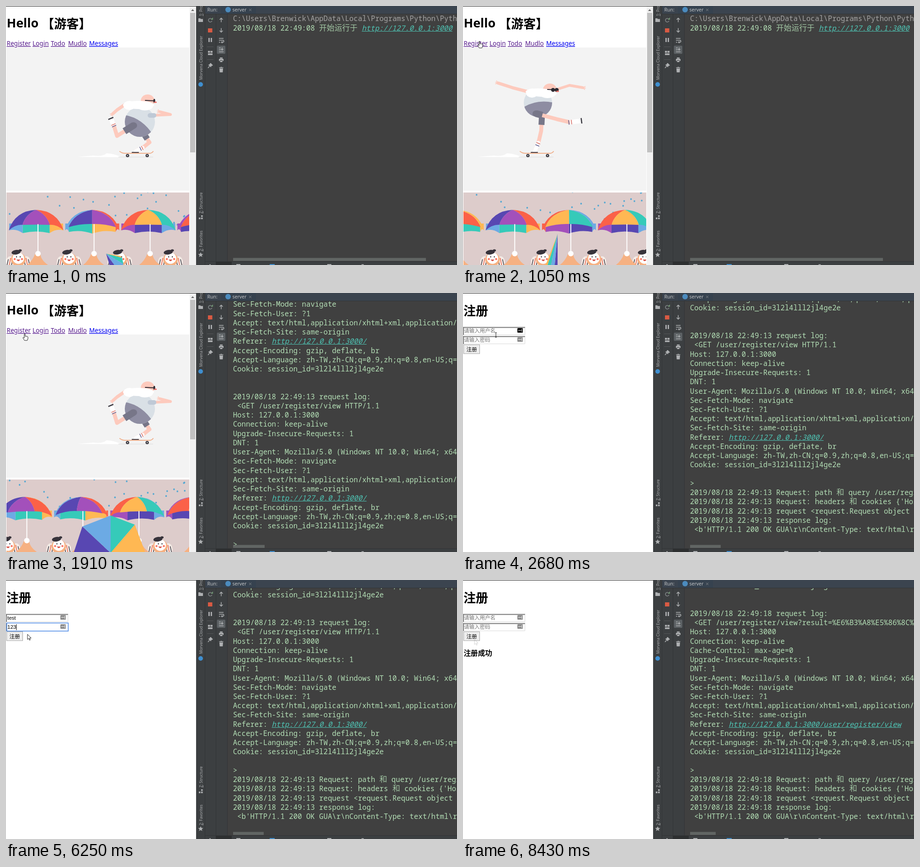
Animation, 987 px wide and 568 px high, one loop 8520 ms. Source, as an HTML page with a canvas:

```html
<!DOCTYPE html>
<html lang="zh">
<head>
<meta charset="utf-8">
<title>Register demo</title>
<style>
html, body { margin: 0; width: 987px; height: 568px; overflow: hidden; background: #fff; }
svg, canvas { position: absolute; left: 0; top: 0; }
svg text { font-family: "Noto Sans", "Noto Sans CJK SC", "Noto Sans CJK JP", sans-serif; white-space: pre; }
#log { position: absolute; left: 485px; top: 18px; width: 502px; height: 542px; overflow: hidden; }
#log pre {
  position: absolute; left: 11.7px; margin: 0; color: #b3deb5;
  font: 15.72px/20.23px "Noto Sans Mono", "Noto Sans CJK SC", "Noto Sans CJK JP", monospace;
}
#log i { color: #4fc4b4; text-decoration: underline; }
#log b { font-size: 16.8px; font-weight: 300; line-height: 0; opacity: .85; }
#log u { color: #a3a3a3; text-decoration: none; }
.h1 { font-size: 27px; font-weight: 700; }
.link { font-size: 13.6px; fill: #551a8b; text-decoration: underline; }
.cjk { font-size: 11.5px; }
.hint { font-size: 11.5px; fill: #757575; }
svg .typed { font: 11.5px "Liberation Sans", Arial, sans-serif; }
.side { font-size: 8.5px; fill: #aeb0b2; }
.ui { font-size: 10.5px; fill: #c2c4c6; }
.ico { fill: #afb1b3; }
.ln { fill: none; stroke: #afb1b3; stroke-width: 1.5; }
</style>
</head>
<body>
<svg id="page" width="987" height="568" viewBox="0 0 987 568">
  <rect width="416" height="1" fill="#222"/>
  <g id="home">
    <text class="h1" x="1.5" y="47">Hello <tspan dy="1.5">【游客】</tspan></text>
    <text class="link" x="1.5" y="87">Register</text>
    <text class="link" x="58" y="87">Login</text>
    <text class="link" x="98" y="87">Todo</text>
    <text class="link" x="136" y="87">Mudlo</text>
    <text class="link" x="182" y="87" style="fill:#00e">Messages</text>
    <rect x="402" y="1" width="14" height="567" fill="#f1f1f1"/>
    <rect x="403" y="15" width="11" height="306" fill="#c1c1c1"/>
    <path d="M405 11l3.5-4 3.5 4z" fill="#6a6a6a"/>
  </g>
  <g id="form">
    <text class="h1" x="1" y="49">注册</text>
    <g id="fields"></g>
    <rect id="btn" x="1.5" y="113.5" width="35" height="19.5" fill="#eee" stroke="#a2a2a2"/>
    <text class="cjk" x="7.5" y="128">注册</text>
    <text id="done" x="1.5" y="166" font-size="15.6" font-weight="700">注册成功</text>
  </g>
  <g id="ide">
    <rect x="416" width="571" height="568" fill="#3c3f41"/>
    <rect x="435" width="552" height="18" fill="#3b444f"/>
    <rect x="470" width="77" height="18" fill="#36424f"/>
    <rect x="484" y="18" width="503" height="542" fill="#404040"/>
    <path d="M435.5 0V568M459.5 18V560M484.5 18V560M435 17.5H987M435 560.5H987" stroke="#323436" fill="none"/>
    <path d="M440 89.5H454M440 117.5H454" stroke="#555759"/>
    <text class="ui" x="440.5" y="12">Run:</text>
    <circle cx="486" cy="8" r="6" fill="#4b8bbe"/>
    <text class="ui" x="495.5" y="12">server</text>
    <path d="M532 6l5 5m0-5l-5 5" stroke="#85898c"/>
    <text class="side" transform="translate(430 22) rotate(-90)"><tspan text-decoration="underline">1</tspan>: Project</text>
    <text class="side" transform="translate(430 162) rotate(-90)">Morvena Cloud Explorer</text>
    <text class="side" transform="translate(430 455) rotate(-90)"><tspan text-decoration="underline">Z</tspan>: Structure</text>
    <text class="side" transform="translate(430 538) rotate(-90)"><tspan text-decoration="underline">2</tspan>: Favorites</text>
    <path class="ico" d="M421 27h4l1.5 1.5h4.500v6.500h-10zM422 464h3.500v3.500h-3.500zM427 464h3.500v3.500h-3.500zM427 459h3.500v3.500h-3.500z"/>
    <path class="ico" d="M426 540l1.500 3.600 4 .3-3 2.600 1 4-3.500-2.200-3.500 2.200 1-4-3-2.600 4-.3z"/>
    <circle cx="426" cy="172" r="5" fill="#3f8fd0"/>
    <path class="ln" d="M450 28.500a4 4 0 1 0 .8 4" style="stroke:#85898b"/>
    <path d="M448 30h5v-5z" fill="#6f9572"/>
    <rect x="442" y="49" width="9.500" height="9" fill="#d95a43"/>
    <path class="ico" d="M443 70h2.800v9h-2.800zM448 70h2.800v9h-2.800zM442 98.500h4.500v4h-4.500zM447.500 98.500h4.500v4h-4.500zM442 104h10v3.500h-10z"/>
    <path class="ico" d="M448 125l5 5-1.500 1-2 .5-1 3-6-5.500 3-1 .8-2z"/>
    <path class="ln" d="M445.500 132l-3.500 4M471 35.500v-9m-3.500 3.500l3.500-3.500 3.500 3.500M471 48.500v9m-3.500-3.500l3.500 3.500 3.500-3.500M466 71h10M466 75h8.500a2 2 0 0 1 0 4.500h-3m2-2l-2 2 2 2M466 79.500h3"/>
    <rect x="461.500" y="87" width="18.500" height="18" rx="2" fill="#5c6164"/>
    <path class="ln" d="M466 92h4M466 96h4M466 100.500h10M473 91v6m-2.500-2.500l2.500 2.500 2.500-2.500"/>
    <path class="ico" d="M468 113h6v2.500h-6zM466 116h10v4.500h-2v-1.500h-6v1.500h-2zM468.500 120h5v3h-5zM467 137h8l-.7 8.500h-6.600zM466.500 134.500h3l.5-1h2l.5 1h3v1.500h-9z"/>
    <rect x="459" y="561" width="35" height="7" fill="#2d2f30"/>
    <path class="ico" d="M445 566.500h3v1.500h-3zM504 566h9v2h-9zM703 566h9v2h-9zM778 566.500h5v1.500h-5z"/>
    <rect x="577" y="566" width="11" height="2" fill="#3f8fd0"/>
  </g>
</svg>
<canvas id="art" width="402" height="568"></canvas>
<div id="log"><pre></pre></div>
<svg id="top" width="987" height="568" viewBox="0 0 987 568">
  <rect id="bar" x="497" y="552.500" height="6.500" fill="#676b69" opacity=".85"/>
  <path id="cursor"/>
</svg>
<script>
const LOOP = 8520;
const $ = s => document.querySelector(s);
const show = (el, on) => { el.style.display = on ? '' : 'none'; };
const mix = (a, b, k) => a + (b - a) * k;
const last = (rows, t) => rows.filter(r => r[0] <= t).pop();

// Bursts of screen refreshes: first, last, count
const BURSTS = [[0, 0, 1], [70, 890, 11], [960, 1510, 8], [1670, 2450, 11], [2530, 2840, 5],
  [4310, 4620, 5], [6100, 6640, 8], [7030, 7740, 10]];
function snap(t) {
  const [a, b, n] = last(BURSTS, t);
  if (n < 2 || t >= b) return b;
  const d = (b - a) / (n - 1);
  return a + Math.floor((t - a) / d) * d;
}

// ---- console ----
const DAY = '2019/08/18 22:49:';
const HOST = 'http://127.0.0.1:3000';
const VIEW = '/user/register/view';
const tail = ref => ['Sec-Fetch-Mode: navigate', 'Sec-Fetch-User: ?1',
  'Accept: text/html,application/xhtml+xml,application/xml;q=0.9',
  'Sec-Fetch-Site: same-origin', 'Referer: ' + HOST + ref, 'Accept-Encoding: gzip, deflate, br',
  'Accept-Language: zh-TW,zh-CN;q=0.9,zh;q=0.8,en-US;q=0.7', 'Cookie: session_id=3l2l4lll2jl4ge2e'];
const request = (sec, call, ref, extra = []) => ['', '', DAY + sec + ' request log:',
  ` <${call} HTTP/1.1`, 'Host: 127.0.0.1:3000', 'Connection: keep-alive', ...extra,
  'Upgrade-Insecure-Requests: 1', 'DNT: 1',
  'User-Agent: Mozilla/5.0 (Windows NT 10.0; Win64; x64) AppleWebKit', ...tail(ref), '', '>'];
const reply = (sec, path, status) => [`Request: path 和 query ${path} {}`,
  "Request: headers 和 cookies {'Host': '127.0.0.1:3000'", 'request <request.Request object at 0x0000',
  'response log:'].map(s => DAY + sec + ' ' + s)
  .concat(` <b'HTTP/1.1 ${status} GUA\\r\\nContent-Type: text/html\\r\\n`);

const first = request(13, 'GET ' + VIEW, '/');
const cache = ['Cache-Control: max-age=0'];
const post = request(18, 'POST /user/register', VIEW, cache);
const final = request(18, `GET ${VIEW}?result=%E6%B3%A8%E5%86%8C%E6%88%90`, VIEW, cache);
// start, top of first line, scrollbar width, lines
const LOGS = [
  [0, 17.4, 422, ['C:\\Users\\Brenwick\\AppData\\Local\\Programs\\Python\\Python36', DAY + '08 开始运行于 ' + HOST]],
  [1750, 14.4, 69, [...tail('/'), ...first]],
  [2370, 2.2, 67, [...tail('/').slice(-2), ...first, ...reply(13, VIEW, '200 OK')]],
  [7110, 2.2, 60, [...tail('/').slice(-1), ...post, ...reply(18, '/user/register', '302 OK')]],
  [7430, 2.2, 56, [...tail('/').slice(-1), ...final, ...reply(18, VIEW, '200 OK')]],
];
const markup = s => s.replace(/</g, '&lt;').replace(/http:\S+/, '<i>$&</i>')
  .replace(/[\u4e00-\u9fff]+/g, '<b>$&</b>').replace(/^C:.*/, '<u>$&</u>');
let shown;
function drawLog(t) {
  const row = last(LOGS, t);
  if (row === shown) return;
  shown = row;
  const pre = $('#log pre');
  pre.style.top = row[1] - 18 + 'px';
  pre.innerHTML = row[3].map(markup).join('\n');
  $('#bar').setAttribute('width', row[2]);
}

// ---- form ----
const FIELDS = [
  { y: 75, hint: '请输入用户名', word: 'test', keys: [3850, 4000, 4150, 4310], focus: [2990, 4770], blink: [3450, 3850], hover: [2600, 4400] },
  { y: 95, hint: '请输入密码', word: '123', keys: [5470, 5700, 5930], focus: [4770, 6560], blink: [5320, 5470], hover: [4540, 6180] },
];
const RELOAD = 7430;
$('#fields').innerHTML = FIELDS.map(({ y, hint }) => `<g>
  <path d="M1 ${y + 17}V${y}.500H136" fill="none" stroke="#777" stroke-width="1.800"/>
  <path d="M2 ${y + 16.5}H135.500V${y + 1}" fill="none" stroke="#d8d8d8"/>
  <rect class="ring" x="1.800" y="${y - .7}" width="134.400" height="17.700" fill="#fff" stroke="#5b93e8" stroke-width="1.700"/>
  <text class="hint" x="2" y="${y + 12}">${hint}</text>
  <text class="typed" x="3" y="${y + 12}"></text>
  <rect class="caret" y="${y + 2}" width="1" height="13"/>
  <rect class="icon" x="119" y="${y + 2}" width="12" height="10" rx="1.500"/>
  <path d="M121 ${y + 7}h6.500M128.800 ${y + 4}v6" stroke="#fff" stroke-width="1.400" stroke-dasharray="1.600 .8"/></g>`).join('');
const within = ([a, b], t) => t >= a && t < b;
function drawForm(t) {
  [...$('#fields').children].forEach((g, i) => {
    const f = FIELDS[i], get = c => g.querySelector(c);
    const n = t < RELOAD ? f.keys.filter(k => k <= t).length : 0;
    const focus = within(f.focus, t);
    get('.typed').textContent = f.word.slice(0, n);
    show(get('.hint'), !n);
    show(get('.ring'), focus);
    show(get('.caret'), focus && !within(f.blink, t) && !within([6430, 6560], t));
    get('.caret').setAttribute('x', 3 + (n ? get('.typed').getComputedTextLength() : 0));
    get('.icon').setAttribute('fill', within(f.hover, t) ? '#000' : '#8b8b8b');
  });
  $('#btn').setAttribute('fill', within([6560, 6790], t) ? '#d2d2d2' : '#eee');
  show($('#done'), t >= RELOAD);
}

// ---- cursor ----
const SHAPES = {
  arrow: 'M0 0V11.500L2.700 9 4.500 13 6.200 12.200 4.500 8.300H8z',
  beam: 'M-2 -5H2M0 -5V5M-2 5H2',
  hand: 'M-1 1Q0 -1 1 1V6Q6 5 7 7.500V11L5.500 15H-.5L-4 9.500Q-4 8 -2.500 8.500L-1 10z',
};
const PATH = [[70, 850, 470, 'beam'], [430, 470, 230, 'arrow'], [890, 38, 86, 'hand'], [960, 36, 77, 'hand'],
  [1510, 36, 77, 'hand'], [1670, 41, 89, 'hand'], [2370, 41, 89, 'arrow'], [2600, 72, 92, 'beam'],
  [4310, 72, 92, 'beam'], [4387, 69, 95, 'arrow'], [4470, 69, 95, 'arrow'], [4543, 69, 102, 'beam'],
  [6100, 69, 102, 'beam'], [6177, 47, 119, 'arrow'], [6320, 47, 119, 'arrow'], [6560, 25, 130, 'arrow'], [LOOP, 25, 130, 'arrow']];
function drawCursor(t, s) {
  const el = $('#cursor');
  show(el, t >= 70);
  if (t < 70) return;
  const i = PATH.findIndex(p => p[0] > s), a = PATH[i - 1], b = PATH[i];
  const k = (s - a[0]) / (b[0] - a[0]);
  const beam = a[3] === 'beam';
  el.setAttribute('d', SHAPES[a[3]]);
  el.setAttribute('transform', `translate(${mix(a[1], b[1], k)} ${mix(a[2], b[2], k)})`);
  el.setAttribute('fill', beam ? 'none' : '#fff');
  el.setAttribute('stroke', beam && a[1] > 485 ? '#ccc' : '#222');
  el.setAttribute('opacity', t >= 7740 ? .2 : 1);
}

// ---- pictures ----
const g = $('#art').getContext('2d');
const SKIN = '#fdcabd', SHORTS = '#777688';
const BLUE = '#5847b2', PURPLE = '#a350bb', RED = '#fb6148', ORANGE = '#ffb853', TEAL = '#36cab9', SKY = '#6caae4';
const fill = (d, c) => { g.fillStyle = c; g.fill(new Path2D(d)); };
const oval = (x, y, rx, ry, c, rot = 0) => { g.fillStyle = c; g.beginPath(); g.ellipse(x, y, rx, ry, rot, 0, 7); g.fill(); };
function line(pts, w, c, cap = 'round') {
  g.strokeStyle = c; g.lineWidth = w; g.lineCap = cap; g.lineJoin = 'round';
  g.beginPath();
  pts.forEach(p => g.lineTo(...p));
  g.stroke();
}
const along = (a, b, k) => [mix(a[0], b[0], k), mix(a[1], b[1], k)];
function across(a, b, k, r, w, c) {
  const [x, y] = along(a, b, k), d = Math.hypot(b[0] - a[0], b[1] - a[1]);
  const nx = (a[1] - b[1]) / d * r, ny = (b[0] - a[0]) / d * r;
  line([[x - nx, y - ny], [x + nx, y + ny]], w, c, 'butt');
}

// Joints in two poses: x, y crouched, x, y kicking
const JOINTS = {
  body: [293, 254, 164, 212], beard: [290, 217, 171, 190], head: [310, 208, 190, 184], board: [286, 321, 162, 321],
  la: [259, 217, 142, 188], lb: [243, 228, 108, 179], lc: [234, 236, 77, 169],
  ra: [318, 240, 205, 183], rb: [360, 238, 233, 174], rc: [337, 232, 262, 179],
  ka: [279, 262, 160, 236], kb: [243, 285, 205, 248], kc: [236, 262, 234, 255], kd: [230, 248, 257, 252],
  sa: [300, 278, 173, 236], sb: [314, 299, 171, 274], sc: [299, 311, 165, 300], sd: [284, 318, 157, 319],
};
function hand(p, q) {
  const a = Math.atan2(q[1] - p[1], q[0] - p[0]);
  [-.6, 0, .6].forEach(d => line([q, [q[0] + 6 * Math.cos(a + d), q[1] + 6 * Math.sin(a + d)]], 1.8, SKIN));
}
function skater(t) {
  const u = t % 1910;
  const k = u < 1050 ? (1 - Math.cos(Math.PI * u / 1050)) / 2 : (1 + Math.cos(Math.PI * (u - 1050) / 860)) / 2;
  const j = {};
  for (const n in JOINTS) { const [a, b, c, d] = JOINTS[n]; j[n] = [mix(a, c, k), mix(b, d, k)]; }
  const [bx, by] = j.board;
  g.fillStyle = '#f3f3f3';
  g.fillRect(1, 91, 400, 314);
  fill(`M${bx - 130} 331L${bx - 95} 328Q${bx - 75} 331 ${bx - 66} 323Q${bx - 50} 324 ${bx - 36} 330V331.500z`, '#fff');
  fill(`M${bx - 40} 330.500H${bx + 36}V332H${bx - 40}z`, '#e3e3e3');

  line([j.sa, j.sb, j.sc, j.sd], 8.5, SKIN);
  line([j.sa, along(j.sa, j.sb, .65)], 13, SHORTS, 'butt');
  line([j.sc, j.sd], 8.5, '#fff');
  across(j.sc, j.sd, .05, 4.5, 1.5, '#d7675d');
  across(j.sc, j.sd, .3, 4.5, 1.5, '#55548a');
  line([[j.sd[0] - 8, 321], [j.sd[0] + 6, 321]], 2, '#45434d');
  g.save();
  g.translate(bx, by);
  g.strokeStyle = '#efb08c'; g.lineWidth = 2;
  g.stroke(new Path2D('M-37 -2Q-32 2 -26 2H28Q33 2 36 -2'));
  [-20, 23].forEach(x => { oval(x, 7, 3.6, 3.6, '#35333b'); oval(x, 7, 1.3, 1.3, '#ddd'); });
  g.restore();

  g.save();
  g.translate(...j.body);
  const r = mix(33, 31, k);
  oval(0, 0, r, r, '#d9e0e6');
  g.clip();
  g.rotate(mix(.5, -.25, k));
  fill('M-40 4Q0 -11 40 12V45H-40z', '#8e8da2');
  g.restore();

  line([j.ka, j.kb, j.kc], 8.5, SKIN);
  oval(...j.ka, 8, 7, SHORTS);
  line([j.ka, along(j.ka, j.kb, mix(.55, .3, k))], 15, SHORTS, 'butt');
  line([j.kc, j.kd], 10, '#fff', 'butt');
  across(j.kc, j.kd, -.1, 5, 1.5, '#55548a');
  across(j.kc, j.kd, .15, 5, 1.5, '#d7675d');
  across(j.kc, j.kd, 1.1, 6, 2.5, '#3a3840');

  line([j.la, j.lb, j.lc], 7, SKIN);
  hand(j.lb, j.lc);
  line([j.ra, j.rb, j.rc], 6, SKIN);
  hand(j.rb, j.rc);
  if (k < .6) line([[j.ra[0] - 3, j.ra[1]], [j.ra[0] + 6, j.ra[1]]], 10, '#bfc9d6');
  const [hx, hy] = j.head, [wx, wy] = j.beard;
  oval(hx, hy, 15, 14, SKIN);
  oval(wx, wy, 34, 9, '#fff', mix(0, .06, k));
  oval(wx - 20, wy + 1, 13, 10, '#fff');
  oval(wx + 14, wy + 2, 18, 10, '#fff');
  line([[hx - 5, hy - 1], [hx + 15, hy]], 2, '#2e2b33');
  const lens = mix(1.5, 4.4, k);
  oval(hx + mix(14, 7, k), hy, lens, 4.2, '#2e2b33');
  oval(hx + 15, hy, lens, 4.2, '#2e2b33');
  oval(hx + 17, hy + 3, 3, 1.5, '#ea6a62');
}

// Canopy of six panels; turn is the panel that faces forward
const PANELS = [BLUE, PURPLE, RED, ORANGE, TEAL, SKY];
const FACING = [1, .5, 3, 2.5];
function umbrella(x, turn) {
  const quarter = Math.PI / 2;
  const clamp = a => Math.max(-quarter, Math.min(quarter, a));
  const each = (shift, draw) => PANELS.forEach((color, n) => {
    const mid = ((n - turn + shift + 9) % 6 - 3) * Math.PI / 3;
    const a = clamp(mid - Math.PI / 6), b = clamp(mid + Math.PI / 6);
    if (a < b) draw(a, b, color);
  });
  const seam = a => [60 * Math.sin(a), 45 - 14 * Math.cos(a)];
  const bend = a => [46 * Math.sin(a), 2 + 9 * Math.cos(a)];
  g.save();
  g.translate(x, 447);
  each(3, (a, b, color) => {
    const l = -59 * Math.sin(b), r = -59 * Math.sin(a);
    const edge = v => 45 + 7 * Math.cos(v);
    fill(`M${l} ${edge(b)}V30H${r}V${edge(a)}Q${(l + r) / 2} ${edge((a + b) / 2) - 8} ${l} ${edge(b)}z`, color);
  });
  each(0, (a, b, color) => {
    const [p, q] = [seam(a), seam(b)];
    fill(`M0 0Q${bend(a)} ${p}Q${(p[0] + q[0]) / 2} ${Math.min(p[1], q[1]) - 1} ${q}Q${bend(b)} 0 0z`, color);
  });
  line([[4, 32], [4, 92]], 2, '#fff');
  fill('M-20 121Q-8 112 -2 96H9Q10 110 26 121z', '#f6b182');
  oval(4, 96, 6, 6, '#fff');
  g.restore();
}
function person(x) {
  g.save();
  g.translate(x, 553);
  [-1, 1].forEach(s => {
    oval(s * 18, 9, 9, 13, '#f4ece6');
    [0, 1, 2].forEach(i => line([[s * (12 + 5 * i), i * 3 - 3], [s * (15 + 5 * i), 16]], 1.6, i % 2 ? '#eb6a55' : '#4b4650'));
  });
  oval(0, 3, 16, 15, '#f6b182');
  oval(0, 0, 12.5, 12.5, '#fff');
  oval(-5, -13, 10, 5, '#37333b', -.15);
  oval(4, -17, 3.5, 2.5, '#37333b');
  [-1, 1].forEach(s => { oval(s * 4, -3, 1.2, 1.5, '#37333b'); oval(s * 8, 2, 2.3, 2.3, '#fa7564'); });
  fill('M-4 3Q0 10 4 3z', '#d95448');
  g.restore();
}
// Centre, then five rim points
const FOLDS = [
  [0, [219, 543], [230, 580], [246, 580], [257, 566], [254, 552], [250, 548]],
  [325, [229, 570], [148, 570], [167, 512], [229, 488], [282, 508], [305, 570]],
  [1050, [207, 500], [207, 570], [200, 576], [191, 576], [183, 574], [180, 570]],
];
FOLDS.push([1585, ...FOLDS[0].slice(1)]);
function folding(u) {
  const i = FOLDS.findIndex(f => f[0] > u), a = FOLDS[i - 1], b = FOLDS[i];
  const k = (u - a[0]) / (b[0] - a[0]), e = k * k * (3 - 2 * k);
  const [c, ...rim] = a.slice(1).map((p, n) => along(p, b[n + 1], e));
  [BLUE, SKY, TEAL, ORANGE].forEach((color, n) => fill(`M${c}L${rim[n]}L${rim[n + 1]}z`, color));
}
const rand = n => { const v = Math.sin(n * 12.9898 + 4) * 43758.5453; return v - Math.floor(v); };
function parade(t) {
  const u = t % 1585;
  g.save();
  g.beginPath();
  g.rect(1, 409, 400, 159);
  g.clip();
  g.fillStyle = '#ddcccb';
  g.fillRect(1, 409, 400, 159);
  for (let i = 0; i < 30; i++) {
    oval(rand(i) * 400, 405 + (rand(i + 50) * 75 + u * 75 / 1585 * 2) % 75, 1.8, 2, '#55a8d2');
  }
  for (let i = -1; i < 6; i++) person(27 + 111 * i - u * .0707);
  for (let i = 0; i < 5; i++) umbrella(66 + 122.7 * i - u * .0765, FACING[i % 4] + u / 2100);
  folding(u);
  g.restore();
}

function render(t) {
  const s = snap(t), home = t < 2370;
  show($('#home'), home);
  show($('#art'), home);
  show($('#form'), !home);
  if (home) {
    g.clearRect(0, 0, 402, 568);
    skater(s);
    parade(s);
  } else drawForm(t);
  drawLog(t);
  drawCursor(t, s);
}
const start = performance.now();
function tick() {
  render((performance.now() - start) % LOOP);
  requestAnimationFrame(tick);
}
tick();
</script>
</body>
</html>
```
